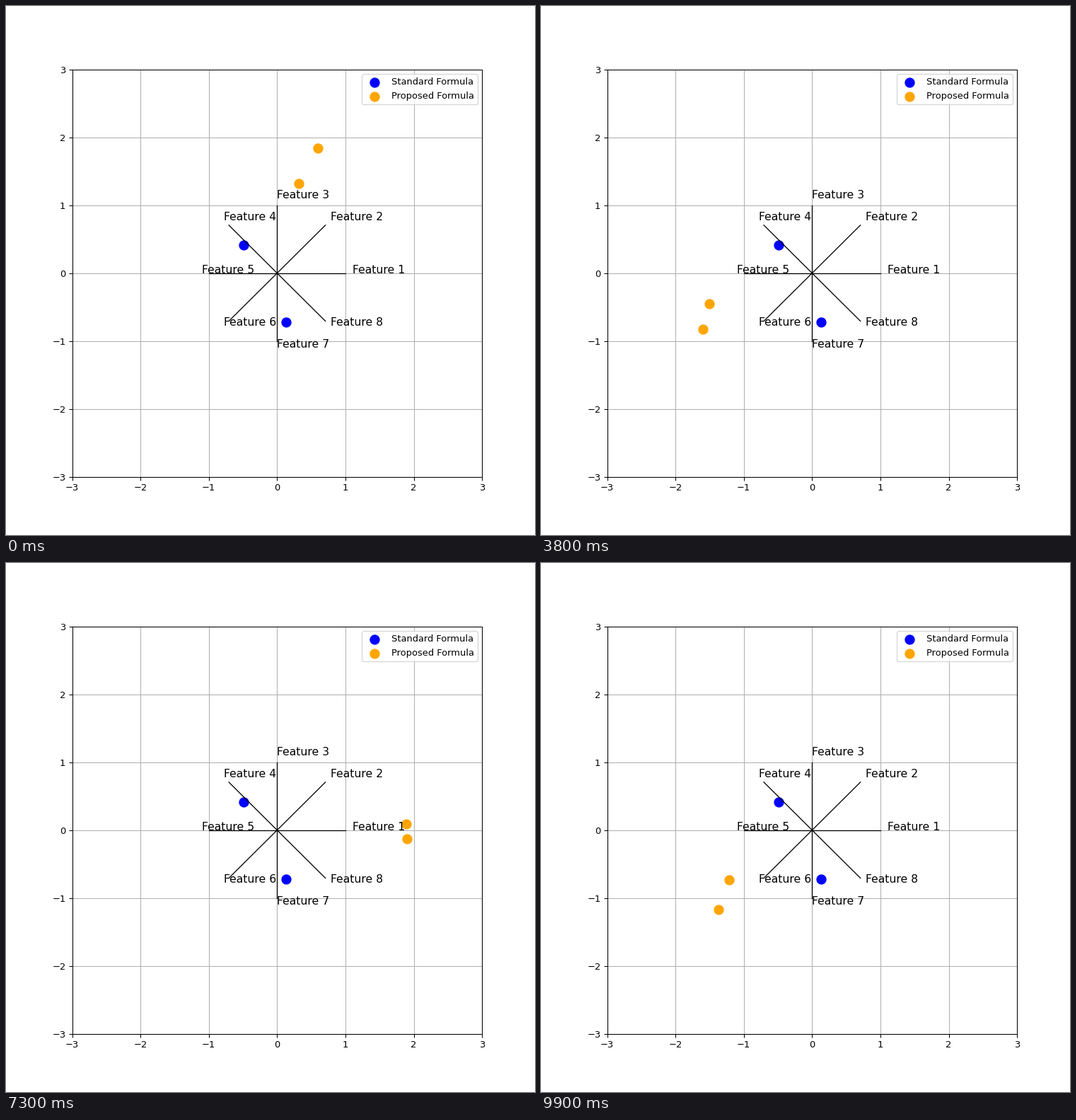
Recreate the animation shown at these times as a matplotlib script. Size 748 by 748 pixels, loop 10 s.

```python
import numpy as np
import matplotlib.pyplot as plt
from matplotlib.animation import FuncAnimation

FRAMES, INTERVAL = 100, 100
SPOKES = 8

STANDARD = np.array([[-0.485, 0.409], [0.136, -0.7215]])

# Each proposed point follows an ellipse: COS * cos(t) + SIN * sin(t)
COS = np.array([[0.592, 1.846], [0.322, 1.320]])
SIN = np.array([[1.854, -1.036], [2.038, -0.963]])


def orbit(t):
    return COS * np.cos(t) + SIN * np.sin(t)


plt.rcParams["font.family"] = "DejaVu Sans"
fig, ax = plt.subplots(figsize=(8, 8), dpi=93.5)
ax.set_xlim(-3, 3)
ax.set_ylim(-3, 3)
ax.grid(True)

for k in range(SPOKES):
    angle = 2 * np.pi * k / SPOKES
    x, y = np.cos(angle), np.sin(angle)
    ax.plot([0, x], [0, y], color="black", lw=1)
    ax.text(1.1 * x, 1.1 * y, f"Feature {k + 1}", fontsize=12)

ax.scatter(*STANDARD.T, s=100, color="blue", label="Standard Formula")
proposed = ax.scatter(*orbit(0).T, s=100, color="orange",
                      label="Proposed Formula")
ax.legend(loc="upper right")


def update(i):
    proposed.set_offsets(orbit(i * INTERVAL / 1000))
    return (proposed,)


anim = FuncAnimation(fig, update, frames=FRAMES, interval=INTERVAL,
                     repeat=True, repeat_delay=0, blit=False)
plt.show()
```
